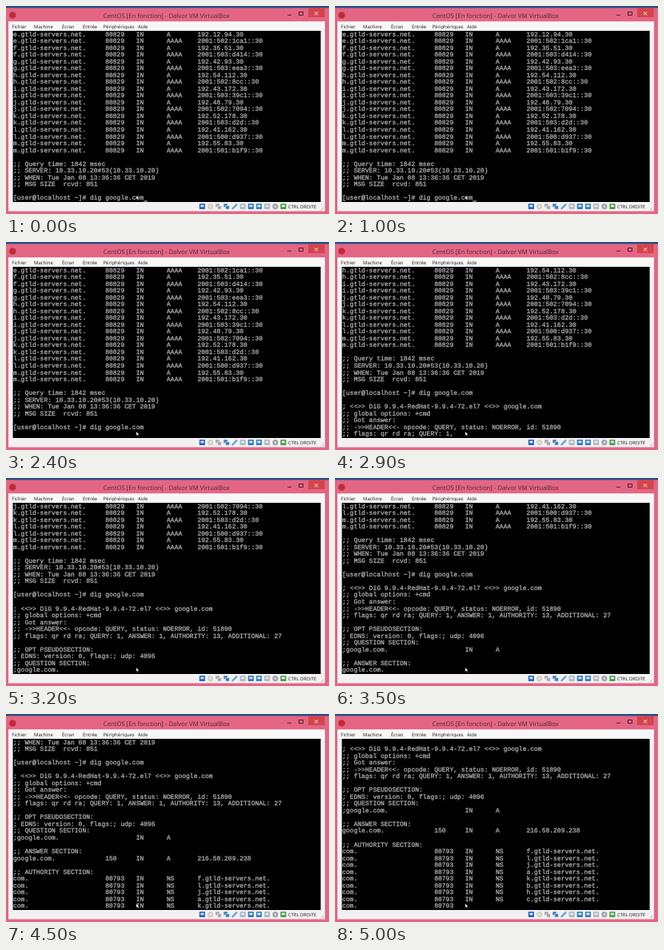
These frames come from a looping animation (404x260 px, 5.1 s). An HTML page:

```html
<!DOCTYPE html>
<html lang="fr">
<head>
<meta charset="utf-8">
<title>Terminal</title>
<style>
  html, body { margin: 0; width: 100%; height: 100%; overflow: hidden; background: #e4668a; }
  svg { display: block; width: 404px; height: 260px; }
  text { text-rendering: geometricPrecision; }
  .ui { font-family: "Open Sans", "Noto Sans", sans-serif; fill: #1c1c1c; }
  .term text {
    font: 8px "Liberation Mono", "DejaVu Sans Mono", monospace;
    fill: #b4b4b4; stroke: #b4b4b4; stroke-width: .25px; white-space: pre;
  }
</style>
</head>
<body>
<svg id="stage" viewBox="0 0 404 260" xmlns="http://www.w3.org/2000/svg">
  <rect width="404" height="260" fill="#e46684"/>
  <rect width="404" height="2.4" fill="#1f4f86"/>

  <!-- title bar -->
  <circle cx="8.3" cy="11.5" r="4.3" fill="#c02c38"/>
  <text class="ui" x="200.8" y="14.6" font-size="7.75" text-anchor="middle" style="fill:#4a2832">CentOS [En fonction] - Dalvor VM VirtualBox</text>
  <rect x="378" y="2.4" width="20.5" height="11.6" fill="#d4444c"/>
  <g fill="none" stroke="#3c1a26" stroke-width=".9">
    <path d="M352 11.3h5"/>
    <rect x="366.5" y="7.5" width="5" height="4"/>
    <path d="M386 7.2l4.3 4.3m0-4.3l-4.3 4.3" stroke="#fff"/>
  </g>

  <!-- window body, menu bar and status bar -->
  <rect x="3" y="19.5" width="396" height="237" fill="#f2f1f2"/>
  <rect x="3" y="19.5" width="396" height="11.5" fill="#f8f7f8"/>
  <g id="menu" class="ui" font-size="6"></g>
  <g id="icons"></g>
  <text class="ui" x="353" y="253" font-size="5.8">CTRL DROITE</text>
  <path d="M393.5 255.5l4-4m-1.5 4l1.5-1.5" stroke="#b0b0b0" stroke-width=".8"/>

  <!-- terminal -->
  <rect x="8.6" y="31" width="385" height="214" fill="#000"/>
  <g id="term" class="term"></g>
  <rect id="caret" x="172.2" y="243.4" width="4.8" height="1.1" fill="#b4b4b4"/>

  <path d="M162.8 236.8v5.4l1.3-1.2.9 2 .9-.4-.9-1.9h1.8z" fill="#fff" stroke="#000" stroke-width=".5"/>
</svg>
<script>
const NS = "http://www.w3.org/2000/svg";
const LOOP = 5100, ROWS = 25, ROW_HEIGHT = 8.535;
const byId = id => document.getElementById(id);

function add(parent, tag, attrs, content = "") {
  const el = document.createElementNS(NS, tag);
  for (const key in attrs) el.setAttribute(key, attrs[key]);
  el.textContent = content;
  parent.appendChild(el);
  return el;
}

const record = (name, ttl, type, value) =>
  name.padEnd(24) + String(ttl).padEnd(8) + "IN".padEnd(8) + type.padEnd(8) + value;

const hosts = [
  ["e", "12.94", "502:1ca1"], ["f", "35.51", "503:d414"], ["g", "42.93", "503:eea3"],
  ["h", "54.112", "502:8cc"], ["i", "43.172", "503:39c1"], ["j", "48.79", "502:7094"],
  ["k", "52.178", "503:d2d"], ["l", "41.162", "500:d937"], ["m", "55.83", "501:b1f9"]
];

const lines = [
  ...hosts.flatMap(([h, v4, v6]) => [
    record(h + ".gtld-servers.net.", 80829, "A", `192.${v4}.30`),
    record(h + ".gtld-servers.net.", 80829, "AAAA", `2001:${v6}::30`)
  ]),
  "",
  ";; Query time: 1842 msec",
  ";; SERVER: 10.33.10.20#53(10.33.10.20)",
  ";; WHEN: Tue Jan 08 13:36:36 CET 2019",
  ";; MSG SIZE  rcvd: 851",
  "",
  "[user@localhost ~]# dig google.com",
  "",
  "; <<>> DiG 9.9.4-RedHat-9.9.4-72.el7 <<>> google.com",
  ";; global options: +cmd",
  ";; Got answer:",
  ";; ->>HEADER<<- opcode: QUERY, status: NOERROR, id: 51890",
  ";; flags: qr rd ra; QUERY: 1, ANSWER: 1, AUTHORITY: 13, ADDITIONAL: 27",
  "",
  ";; OPT PSEUDOSECTION:",
  "; EDNS: version: 0, flags:; udp: 4096",
  ";; QUESTION SECTION:",
  record(";google.com.", "", "A", ""),
  "",
  ";; ANSWER SECTION:",
  record("google.com.", 150, "A", "216.58.209.238"),
  "",
  ";; AUTHORITY SECTION:",
  ...[..."fljakbhcd"].map(h => record("com.", 80793, "NS", h + ".gtld-servers.net."))
];

// [time, bottom line, characters of it already printed]
const output = [
  [0, 24], [2400, 25], [2500, 26, 26], [2600, 27],
  [2800, 29, 20], [2900, 30, 30], [3000, 32, 8], [3100, 33], [3200, 35, 12],
  [3400, 36], [3500, 38, 12],
  [3700, 39], [3800, 41, 12], [3900, 42, 4], [4000, 43, 4], [4100, 43],
  [4300, 44, 30], [4400, 45, 4], [4500, 45], [4600, 46], [4700, 47, 30], [4800, 48],
  [5000, 49, 29]
];

[["Fichier", 7.3], ["Machine", 35], ["Écran", 70], ["Entrée", 96], ["Périphériques", 121.5], ["Aide", 165]]
  .forEach(([label, x]) => add(byId("menu"), "text", { x, y: 27.6 }, label));

// Status icons, each drawn in an 8 by 8 box.
const draw = {
  panel(g, fill) {
    add(g, "rect", { x: .3, y: .5, width: 7.2, height: 7, rx: .8, fill });
    add(g, "rect", { x: 2, y: 2, width: 3.8, height: 2.6, fill: "#dcebf8" });
  },
  disc(g, fill) {
    add(g, "circle", { cx: 4, cy: 4, r: 3.6, fill });
    add(g, "circle", { cx: 4, cy: 4, r: 1.1, fill: "#f4f4f4" });
  },
  pair(g, fill) {
    add(g, "rect", { x: .4, y: .6, width: 4.6, height: 4, fill });
    add(g, "rect", { x: 2.8, y: 3.2, width: 4.8, height: 4.2, fill, stroke: "#e8eef4", "stroke-width": .6 });
  },
  pen(g, fill) {
    add(g, "path", { d: "M1.4 6.6L6.4 1.6", stroke: fill, "stroke-width": 2.4, "stroke-linecap": "round" });
  }
};

[["panel", "#2468c4"], ["disc", "#d6d0c4"], ["pair", "#a4a8ac"], ["pair", "#3c7cc0"],
 ["pen", "#6ca4d4"], ["panel", "#b0b8c4"], ["panel", "#2c7cc8"], ["panel", "#3c84c4"],
 ["panel", "#b4b8c0"], ["disc", "#a4a4ac"], ["panel", "#4ca044"]]
  .forEach(([kind, fill], i) =>
    draw[kind](add(byId("icons"), "g", { transform: `translate(${241.5 + i * 10.15} 246.6)` }), fill));

const rows = Array.from({ length: ROWS }, (_, i) =>
  add(byId("term"), "text", { x: 9, y: 37.5 + i * ROW_HEIGHT }));

function render(t) {
  const [, last, chars] = output.filter(([time]) => time <= t).pop();
  rows.forEach((row, i) => {
    const index = last - ROWS + 1 + i;
    const text = index === last ? lines[index].slice(0, chars) : lines[index];
    if (row.textContent !== text) row.textContent = text;
  });
  byId("caret").setAttribute("visibility", t < 1900 ? "visible" : "hidden");
}

const start = performance.now();
function tick() {
  render((performance.now() - start) % LOOP);
  requestAnimationFrame(tick);
}
tick();
</script>
</body>
</html>
```
